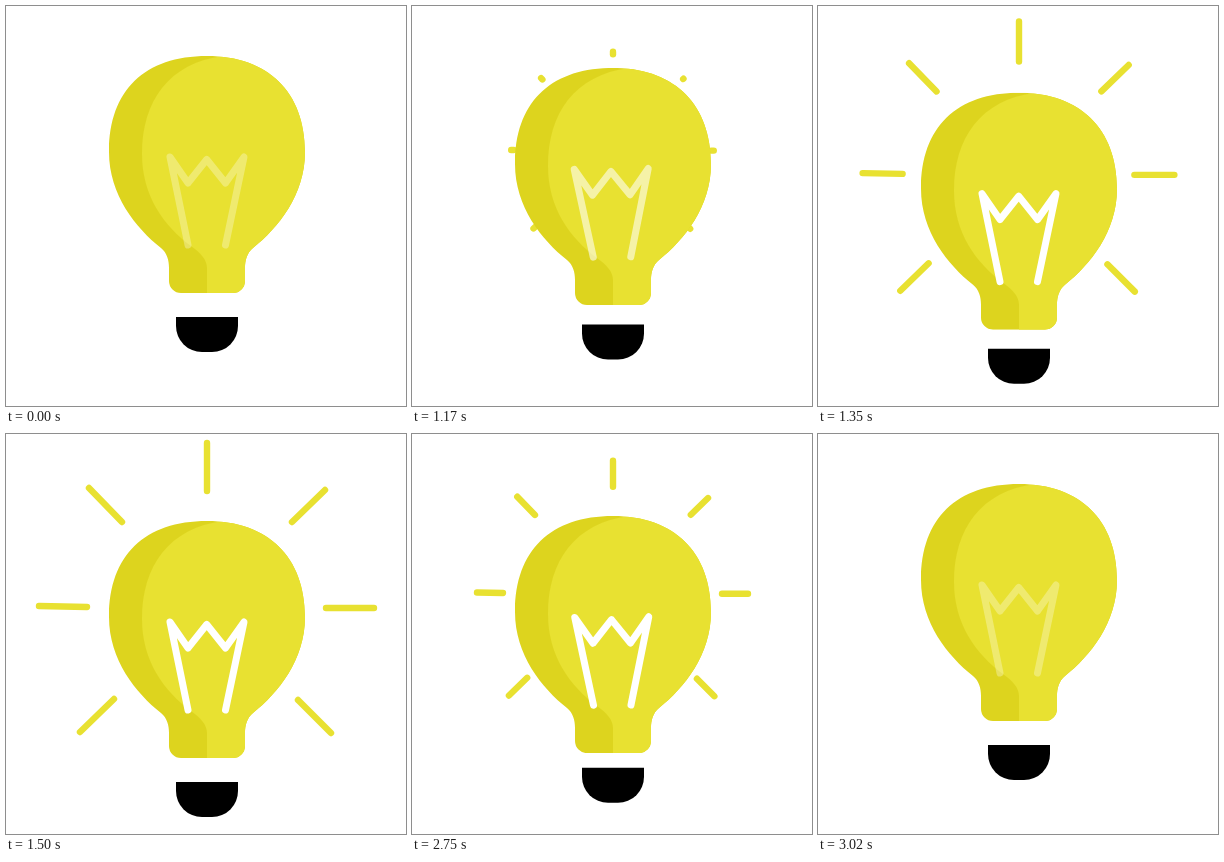
Write an HTML page that moves like this. It is 400x400 px and loops after 3.05 s.

```html
<!DOCTYPE html>
<html lang="en">
<head>
<meta charset="utf-8">
<title>Light bulb</title>
<style>
  html, body { margin: 0; width: 100%; height: 100%; overflow: hidden; background: #fff; }
  svg { display: block; width: 100%; height: 100%; }
</style>
</head>
<body>
<svg viewBox="0 0 400 400">
  <clipPath id="glass">
    <path d="M201 50C139 50 103 84 103 146C103 189 130 222 155 242C161 247 163 254 163 262V275A12 12 0 0 0 175 287H227A12 12 0 0 0 239 275V262C239 254 241 247 247 242C272 222 299 189 299 146C299 86 262 50 201 50Z"/>
  </clipPath>
  <g id="rays" stroke="#e8e131" stroke-width="6.4" stroke-linecap="round"></g>
  <path id="base" d="M170 311H232V320A26 26 0 0 1 206 346H196A26 26 0 0 1 170 320Z"/>
  <g id="bulb">
    <g clip-path="url(#glass)">
      <path fill="#ddd41e" d="M100 45H305V290H100Z"/>
      <path fill="#e8e131" d="M217 50C163 57 136 95 136 148C136 190 158 220 185 240C195 247 201 254 201 262V290H305V45H217Z"/>
    </g>
    <path id="filament" fill="none" stroke="#fff" stroke-width="7" stroke-linecap="round" stroke-linejoin="round"
          d="M182 239L164 151L182 177L200.7 153.5L219.5 177L238 151L219.5 239"/>
  </g>
</svg>
<script>
const LOOP = 3050, STEPS = 20, DROP = 37;
const byId = id => document.getElementById(id);
const clamp = v => Math.min(1, Math.max(0, v));
const easeInOut = (v, power) =>
  v < 0.5 ? (2 * v) ** power / 2 : 1 - (2 - 2 * v) ** power / 2;

// Inner and outer end of each fully extended ray
const rays = [
  [201, 57, 201, 9], [286, 88, 319, 56], [320, 174, 368, 174], [292, 266, 325, 299],
  [108, 265, 74, 298], [81, 173, 33, 172], [116, 88, 83, 54]
].map(([x1, y1, x2, y2]) => {
  const length = Math.hypot(x2 - x1, y2 - y1);
  const line = document.createElementNS('http://www.w3.org/2000/svg', 'line');
  byId('rays').append(line);
  return { x1, y1, x2, y2, line, dx: (x2 - x1) / length, dy: (y2 - y1) / length };
});

// Steps last 20 and 30 ms in turn
const stepsDone = (elapsed, firstDelay) =>
  Math.min(STEPS, Math.floor(elapsed / 50) * 2 + (elapsed % 50 >= firstDelay ? 2 : 1));

function progress(t) {
  if (t < 1020) return 0;
  if (t < 2550) return stepsDone(t - 1020, 30) / STEPS;
  return 1 - stepsDone(t - 2550, 20) / STEPS;
}

function draw(t) {
  const p = progress(t);
  const slow = easeInOut(p, 2.5);
  const fast = easeInOut(clamp(p / 0.81), 3);
  const drop = (id, amount) => byId(id).setAttribute('transform', `translate(0 ${DROP * amount})`);

  drop('bulb', fast);
  drop('base', slow);
  drop('rays', slow - 1);

  const wobble = 1.05 * (1 - p) * Math.sin(10 * Math.PI * p);
  byId('filament').setAttribute('transform', `rotate(${wobble} 200.5 300)`);
  byId('filament').setAttribute('opacity', clamp(0.3 + 0.85 * fast));

  const innerPull = 26 * (1 - slow), outerPull = 83.3 * (1 - slow);
  byId('rays').setAttribute('visibility', outerPull - innerPull < 48 ? 'visible' : 'hidden');
  for (const { x1, y1, x2, y2, dx, dy, line } of rays) {
    line.setAttribute('x1', x1 - dx * innerPull);
    line.setAttribute('y1', y1 - dy * innerPull);
    line.setAttribute('x2', x2 - dx * outerPull);
    line.setAttribute('y2', y2 - dy * outerPull);
  }
}

const start = performance.now();
function tick() {
  draw((performance.now() - start) % LOOP);
  requestAnimationFrame(tick);
}
tick();
</script>
</body>
</html>
```
